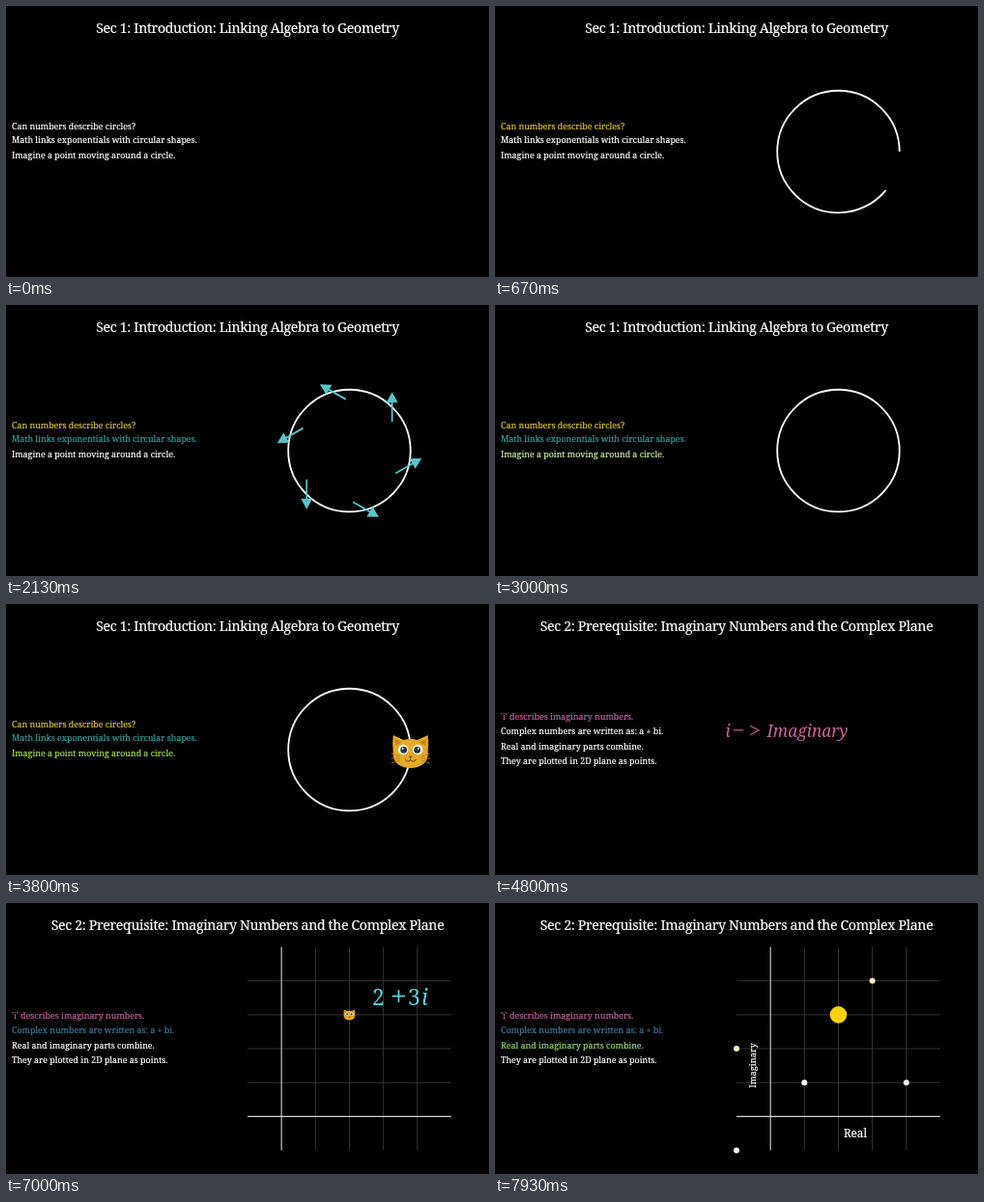
Animation of 500x281 px, one loop 8000 ms. Source, as an HTML page with a canvas:

```html
<!DOCTYPE html>
<html lang="en">
<head>
<meta charset="utf-8">
<title>Algebra and geometry</title>
<style>
  html, body { margin: 0; height: 100%; overflow: hidden; background: #000; }
  canvas { display: block; width: 100vw; height: 100vh; }
</style>
</head>
<body>
<canvas id="stage"></canvas>
<script>
const W = 500, H = 281, LOOP = 8000, TAU = Math.PI * 2;
const canvas = document.getElementById('stage');
const ctx = canvas.getContext('2d');
const ratio = window.devicePixelRatio || 1;
canvas.width = W * ratio;
canvas.height = H * ratio;

const SERIF = '"Noto Serif", serif';
const OPERATORS = '"Liberation Serif", serif';
const WHITE = '#ffffff', GOLD = '#fdd205', TEAL = '#58c4ca';
const UNIT = W * 9 / 128;
const ring = { x: W / 2 + 3 * UNIT, y: H / 2 + 0.3 * UNIT, r: 1.8 * UNIT };
const plane = { x: W / 2 + UNIT, y: H / 2 + 2.3 * UNIT };

const ease = (t, from, to) => {
  const x = Math.min(1, Math.max(0, (t - from) / (to - from)));
  return x * x * x * (x * (6 * x - 15) + 10);
};
const mix = (a, b, p) => {
  const channel = (hex, i) => parseInt(hex.substr(1 + 2 * i, 2), 16);
  const parts = [0, 1, 2].map(i => Math.round(channel(a, i) + (channel(b, i) - channel(a, i)) * p));
  return `rgb(${parts})`;
};
const onRing = angle => [ring.x + ring.r * Math.cos(angle), ring.y - ring.r * Math.sin(angle)];
const onPlane = (re, im) => [plane.x + re * UNIT, plane.y - im * UNIT];

// Runs a drawing in its own coordinate frame.
function at(x, y, draw, { angle = 0, scale = 1, alpha = 1 } = {}) {
  if (scale <= 0 || alpha <= 0) return;
  ctx.save();
  ctx.translate(x, y);
  ctx.rotate(angle);
  ctx.scale(scale, scale);
  ctx.globalAlpha = alpha;
  draw();
  ctx.restore();
}

// Text with a hairline outline, which gives it a slightly heavier weight.
function text(str, x, y, size, color = WHITE,
  { align = 'left', family = SERIF, style = '', spacing = 0, outline = 0.2 } = {}) {
  ctx.font = `${style} ${size}px ${family}`;
  ctx.letterSpacing = `${spacing}px`;
  ctx.textAlign = align;
  ctx.fillStyle = ctx.strokeStyle = color;
  ctx.lineWidth = outline;
  ctx.fillText(str, x, y);
  if (outline) ctx.strokeText(str, x, y);
}

function stroke(points, color, width) {
  ctx.beginPath();
  points.forEach(p => ctx.lineTo(...p));
  ctx.strokeStyle = color;
  ctx.lineWidth = width;
  ctx.stroke();
}

function polygon(points, color) {
  ctx.beginPath();
  points.forEach(p => ctx.lineTo(...p));
  ctx.closePath();
  ctx.fillStyle = color;
  ctx.fill();
}

function disc(x, y, r, color) {
  ctx.beginPath();
  ctx.arc(x, y, r, 0, TAU);
  ctx.fillStyle = color;
  ctx.fill();
}

const title = str => text(str, 250, 27.8, 14.2, WHITE, { align: 'center', spacing: -0.36 });

// Each line: text, baseline, highlight colour, highlight start and end.
function notes(t, lines) {
  for (const [str, y, color, from, to] of lines)
    text(str, 6, y, 8.87, mix(WHITE, color, ease(t, from, to)));
}

// Reveals a formula from left to right; pieces are [text, x, style].
function formula(pieces, baseline, size, color, left, right, shown, alpha) {
  if (shown <= 0 || alpha <= 0) return;
  ctx.save();
  ctx.globalAlpha = alpha;
  ctx.beginPath();
  ctx.rect(left, baseline - size, (right - left) * shown, size * 1.5);
  ctx.clip();
  for (const [str, x, style] of pieces) {
    if (/[−+>]/.test(str)) text(str, x, baseline, size * 1.23, color, { family: OPERATORS });
    else text(str, x, baseline, size, color, { style, outline: 0 });
  }
  ctx.restore();
}

function cat() {
  ctx.beginPath();
  ctx.moveTo(-18, -17);
  ctx.lineTo(-7, -12);
  ctx.quadraticCurveTo(0, -14, 7, -12);
  ctx.lineTo(18, -17);
  ctx.quadraticCurveTo(19, -8, 18, 0);
  ctx.bezierCurveTo(19, 12, 10, 17, 0, 17);
  ctx.bezierCurveTo(-10, 17, -19, 12, -18, 0);
  ctx.quadraticCurveTo(-19, -8, -18, -17);
  ctx.fillStyle = '#e4aa28';
  ctx.fill();
  for (const side of [-1, 1]) {
    polygon([[16 * side, -13], [9 * side, -10], [15.5 * side, -6]], '#c9811d');
    disc(7.5 * side, -2, 5.3, '#f7f3e8');
    disc(7 * side, -1.7, 3.4, '#24303c');
    disc(8 * side, -3, 1, WHITE);
    for (const k of [0, 1, 2])
      stroke([[11 * side, 5 + 2 * k], [20 * side, 2 + 5 * k]], '#b87918', 0.9);
    ctx.beginPath();
    ctx.arc(2.7 * side, 7.5, 2.7, 0, Math.PI);
    ctx.strokeStyle = '#6e4719';
    ctx.lineWidth = 1;
    ctx.stroke();
  }
  polygon([[-2.3, 4.5], [2.3, 4.5], [0, 7.5]], '#925021');
}

function arrow() {
  stroke([[0, 0], [21, 0]], TEAL, 1.8);
  polygon([[20, -6], [31, 0], [20, 6]], TEAL);
}

function arrows(t) {
  const moving = t >= 1600;
  const travel = ease(t, 1600, 2420) * Math.PI / 3;
  const scale = ease(t, 930, 1510);
  const alpha = 1 - ease(t, 2420, 2680);
  for (let k = 0; k < 6; k++) {
    const base = k * Math.PI / 3, heading = base + Math.PI / 2;
    let [x, y] = onRing(base + travel);
    if (moving) {
      x -= 15.5 * Math.cos(heading);
      y += 15.5 * Math.sin(heading);
    }
    at(x, y, arrow, { angle: -heading, scale, alpha });
  }
}

function introduction(t) {
  title('Sec 1: Introduction: Linking Algebra to Geometry');
  notes(t, [
    ['Can numbers describe circles?', 128.3, '#dcc040', 0, 470],
    ['Math links exponentials with circular shapes.', 142, '#3a9a9d', 930, 1330],
    ['Imagine a point moving around a circle.', 157.6, '#a4de52', 2700, 3300]
  ]);
  const drawn = ease(t, 0, 900);
  if (drawn > 0) {
    ctx.beginPath();
    ctx.arc(ring.x, ring.y, ring.r, 0, -TAU * drawn, true);
    ctx.strokeStyle = WHITE;
    ctx.lineWidth = 1.8;
    ctx.stroke();
  }
  arrows(t);
  const [x, y] = onRing(TAU * ease(t, 3800, 4230));
  at(x, y + 2, cat, { scale: ease(t, 3400, 3760) });
}

function grid(t) {
  const grown = ease(t, 5270, 5700);
  if (grown <= 0) return;
  const line = (a, b, color, width) => {
    const [x1, y1] = onPlane(...a), [x2, y2] = onPlane(...b);
    stroke([[x1, y1], [x1 + (x2 - x1) * grown, y1 + (y2 - y1) * grown]], color, width);
  };
  for (let k = 1; k < 5; k++) {
    line([k, -1], [k, 5], '#3c3c3c', 0.9);
    line([-1, k], [5, k], '#3c3c3c', 0.9);
  }
  line([-1, 0], [5, 0], '#d4d4d4', 1.1);
  line([0, -1], [0, 5], '#d4d4d4', 1.1);
}

function planePoints(t) {
  const points = [[-1, 2, 0.45], [3, 4, 0.4], [4, 1, 0.12], [1, 1, 0.06], [-1, -1, 0]];
  const tint = ease(t, 7750, 7930);
  for (const [re, im, warmth] of points) {
    const [x, y] = onPlane(re, im);
    at(x, y, () => disc(0, 0, 3, mix(WHITE, '#ffe860', warmth * tint)),
      { alpha: ease(t, 7480, 7800) });
  }
}

function complexPlane(t) {
  title('Sec 2: Prerequisite: Imaginary Numbers and the Complex Plane');
  notes(t, [
    ["'i' describes imaginary numbers.", 119.7, '#c4609c', 4400, 4750],
    ['Complex numbers are written as: a + bi.', 135.2, '#41789b', 5270, 5650],
    ['Real and imaginary parts combine.', 150.8, '#8fd674', 7000, 7400],
    ['They are plotted in 2D plane as points.', 166.2, WHITE, 7870, 8000]
  ]);
  formula([['i', 238.5, 'italic'], ['−', 246, ''], ['>', 263, ''], ['Imaginary', 281.5, 'italic']],
    138.4, 17.2, '#c8649f', 236, 372, ease(t, 4330, 4800), 1 - ease(t, 5000, 5220));

  grid(t);
  formula([['2', 379, ''], ['+', 398.5, ''], ['3', 416, ''], ['i', 430, 'italic']],
    105.9, 23, '#5cd2de', 376, 440, ease(t, 5560, 5960), 1 - ease(t, 7000, 7300));

  const go = ease(t, 6130, 6800);
  at(...onPlane(2 * go, 3 * go), cat,
    { scale: 0.32 * ease(t, 5660, 5960), alpha: 1 - ease(t, 7000, 7300) });
  at(...onPlane(2, 3), () => disc(0, 0, 8.8, GOLD), { scale: ease(t, 7000, 7330) });

  const labels = { alpha: ease(t, 7070, 7450) };
  at(373, 243.3, () => text('Real', 0, 0, 11.7, WHITE, { align: 'center' }), labels);
  at(270, 168.5, () => text('Imaginary', 0, 0, 9.3, WHITE, { align: 'center' }),
    { ...labels, angle: -Math.PI / 2 });
  planePoints(t);
}

const start = performance.now();
function render() {
  const t = (performance.now() - start) % LOOP;
  ctx.setTransform(ratio, 0, 0, ratio, 0, 0);
  ctx.fillStyle = '#000';
  ctx.fillRect(0, 0, W, H);
  if (t < 4260) introduction(t);
  else complexPlane(t);
  requestAnimationFrame(render);
}
render();
</script>
</body>
</html>
```
